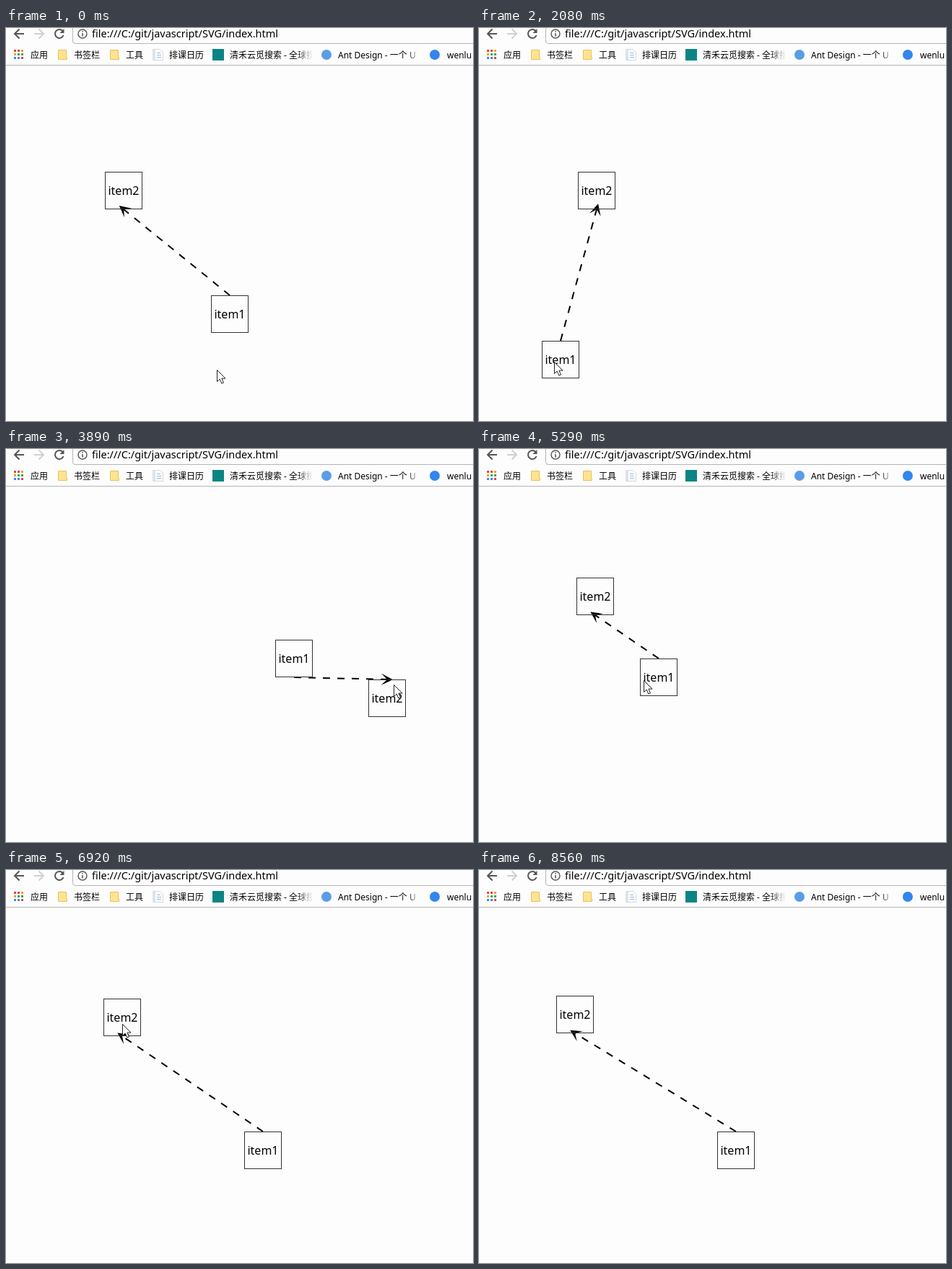
Write an HTML page that moves like this. It is 647x544 px and loops after 8.81 s.

```html
<!DOCTYPE html>
<html lang="zh">
<head>
<meta charset="utf-8">
<title>SVG</title>
<style>
html, body { margin: 0; width: 100%; height: 100%; overflow: hidden; background: #fdfdfd; }
svg { display: block; }
text { font-family: "Noto Sans", "Noto Sans CJK SC", "Noto Sans CJK", sans-serif; fill: #000; }
.mark text { font-size: 12px; }
.item text { font-size: 16px; text-anchor: middle; }
.item rect { fill: none; stroke: #333; }
.icon { fill: none; stroke: #555; stroke-width: 2; }
</style>
</head>
<body>
<svg width="647" height="544" viewBox="0 0 647 544">
  <defs>
    <linearGradient id="fade">
      <stop offset="0" stop-color="#fdfdfd" stop-opacity="0"/>
      <stop offset="1" stop-color="#fdfdfd"/>
    </linearGradient>
    <clipPath id="clip"><rect x="300" y="26" width="124" height="24"/></clipPath>
    <marker id="head" markerWidth="12" markerHeight="12" refX="6" refY="6" viewBox="0 0 12 12" orient="auto">
      <path d="M2,2 L10,6 L2,10 L6,6 Z"/>
    </marker>
  </defs>
  <rect width="647" height="544" fill="#fdfdfd"/>

  <g class="icon">
    <path id="arrow" d="M25,8 H12 M18.5,1.5 L12,8 L18.5,14.5"/>
    <path d="M39,8 H52 M45.5,1.5 L52,8 L45.5,14.5" stroke="#d0d0d0"/>
    <path d="M78.5,4 A6,6 0 1 0 79.6,10"/>
    <path d="M80.5,1 V7 H74.5 Z" fill="#555" stroke="none"/>
    <circle cx="106" cy="8" r="6" stroke-width="1.4"/>
    <path d="M106,7 V11.5 M106,4 V5.6" stroke-width="1.5"/>
    <path d="M92.5,-2 V18 Q92.5,21.5 96,21.5 H650" stroke="#b4b4b4" stroke-width="1"/>
  </g>
  <text x="119" y="13" font-size="14.5">file:///C:/git/javascript/SVG/index.html</text>

  <g class="mark">
    <g id="apps"></g>
    <g fill="#ffe391" stroke="#e6c25c">
      <path d="M72.5,30.5 H83.5 V40.5 H84.5 V43.5 H72.5 Z"/>
      <path d="M144.5,30.5 H155.5 V40.5 H156.5 V43.5 H144.5 Z"/>
    </g>
    <path d="M203.5,29.5 H213.5 L217.5,33.5 V44.5 H203.5 Z" fill="#fff" stroke="#d3d8de"/>
    <path d="M203,30 H207 V44 H203 Z" fill="#dce3ea"/>
    <path d="M209,34.5 H214 M209,37.5 H215 M209,40.5 H215" stroke="#94b5d8"/>
    <rect x="286" y="29" width="16" height="16" fill="#0c8484"/>
    <circle cx="444" cy="37" r="7" fill="#5a9de6"/>
    <circle cx="594" cy="37" r="7" fill="#3385ef"/>
    <text x="34" y="42">应用</text>
    <text x="94" y="42">书签栏</text>
    <text x="166" y="42">工具</text>
    <text x="226" y="42">排课日历</text>
    <text x="310" y="42" clip-path="url(#clip)">清禾云觅搜索 - 全球搜索</text>
    <text x="460" y="42">Ant Design - 一个 U</text>
    <text x="611" y="42">wenlu</text>
    <rect x="402" y="28" width="23" height="18" fill="url(#fade)"/>
    <rect x="555" y="28" width="19" height="18" fill="url(#fade)"/>
  </g>
  <path d="M0,51.5 H647" stroke="#b4b4b4"/>

  <path id="link" fill="none" stroke="#000" stroke-width="2" stroke-dasharray="10,10" marker-end="url(#head)"/>
  <g class="item" id="item1"><rect x=".5" y=".5" width="51" height="51"/><text x="26" y="32">item1</text></g>
  <g class="item" id="item2"><rect x=".5" y=".5" width="51" height="51"/><text x="26" y="32">item2</text></g>
  <path id="cursor" d="M0,0 V16 L3.7,12.5 L6.3,18.5 L9,17.4 L6.4,11.6 H11.5 Z" fill="#fff" stroke="#222"/>
</svg>
<script>
const $ = id => document.getElementById(id);
const LOOP = 8810, STEP = 137.5, LAST = 62;

// Each drag carries one box through evenly timed points;
// grip is where the pointer holds the box.
const drags = [
  { box: "item1", from: 1, every: 3, grip: [18, 30],
    points: [[284, 370], [375, 335], [345, 229], [229, 53], [12, 200], [150, 492], [373, 264]] },
  { box: "item2", from: 22, every: 3, grip: [36, 8],
    points: [[137, 199], [190, 392], [502, 319], [300, 162], [135, 178]] },
  { box: "item1", from: 36, every: 2, grip: [6, 31],
    points: [[373, 264], [223, 290], [165, 262], [138, 190], [230, 142], [390, 215], [330, 362]] },
  { box: "item2", from: 50, every: 2, grip: [27, 36],
    points: [[135, 178], [360, 215], [502, 340], [380, 440], [250, 330], [107, 174]] }
];
for (const d of drags) d.to = d.from + d.every * (d.points.length - 1);

// free pointer positions between the drags
const rest = (at, x, y) => ({ from: at, to: at, every: 1, grip: [0, 0], points: [[x, y]] });
const moves = [...drags, rest(0, 293, 474), rest(21, 208, 261), rest(LAST, 612, 522)]
  .sort((a, b) => a.from - b.from);

// smooth curve through the points, flat at turning points and ends
function slope(p, i, c) {
  if (!p[i - 1] || !p[i + 1]) return 0;
  const a = p[i][c] - p[i - 1][c], b = p[i + 1][c] - p[i][c];
  return a * b > 0 ? (a + b) / 2 : 0;
}

function along({ points: p, from, to, every }, k) {
  const f = (Math.min(Math.max(k, from), to) - from) / every;
  const i = Math.floor(f), u = f - i, v = 1 - u;
  if (!u) return p[i];
  const s = u * u * (3 - 2 * u);
  return [0, 1].map(c => Math.round(
    p[i][c] * (1 - s) + p[i + 1][c] * s +
    u * v * (slope(p, i, c) * v - slope(p, i + 1, c) * u)));
}

function boxAt(name, k) {
  const own = drags.filter(d => d.box === name);
  return along(own.filter(d => d.from <= k).pop() || own[0], k);
}

const held = (m, k) => along(m, k).map((v, c) => v + m.grip[c]);

function pointer(k) {
  const m = moves.filter(d => d.from <= k).pop();
  const next = moves[moves.indexOf(m) + 1];
  if (k <= m.to) return held(m, k);
  const a = held(m, k), b = held(next, k), u = (k - m.to) / (next.from - m.to);
  return a.map((v, c) => Math.round(v + (b[c] - v) * u));
}

const place = (id, x, y) => $(id).setAttribute("transform", `translate(${x},${y})`);

function draw(t) {
  const k = Math.min(Math.floor(t / STEP), LAST);
  const [ax, ay] = boxAt("item1", k), [bx, by] = boxAt("item2", k);
  place("item1", ax, ay);
  place("item2", bx, by);
  const below = ay > by;
  $("link").setAttribute("d",
    `M${ax + 26},${ay + (below ? 0 : 52)} L${bx + 26},${by + (below ? 52 : 0)}`);
  const [x, y] = pointer(k);
  place("cursor", x - 0.5, y - 0.5);
  $("cursor").style.display = k === LAST ? "none" : "";
}

const tints = ["#e8453c", "#f0a030", "#3aa757", "#4285f4"];
for (let i = 0; i < 9; i++)
  $("apps").innerHTML += `<rect x="${11 + i % 3 * 5}" y="${30 + Math.floor(i / 3) * 5}"
    width="3" height="3" fill="${tints[Math.floor(i / 2) % 4]}"/>`;

const start = performance.now();
function tick() {
  draw((performance.now() - start) % LOOP);
  requestAnimationFrame(tick);
}
tick();
</script>
</body>
</html>
```
